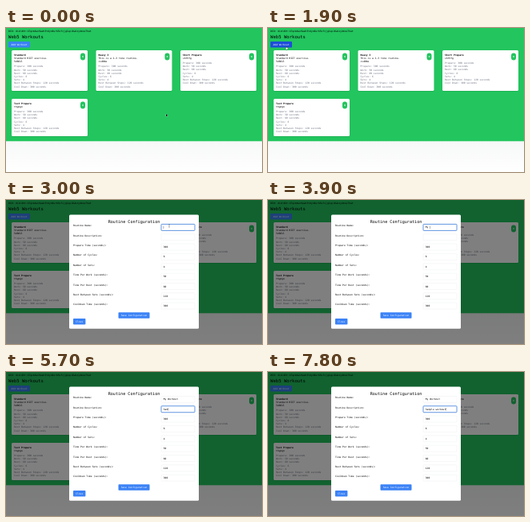
These frames come from a looping animation (320x181 px, 8000 ms). An HTML page with a canvas:

```html
<!DOCTYPE html>
<html lang="en">
<head>
<meta charset="utf-8">
<title>Workouts</title>
<style>
  html, body { margin: 0; width: 100%; height: 100%; overflow: hidden; background: #fff; }
  canvas { display: block; width: 100vw; height: 100vh; }
</style>
</head>
<body>
<canvas id="stage"></canvas>
<script>
const W = 320, H = 181, LOOP = 8000;
const GREEN = '#22c55e', BLUE = '#3b82f6', DARK_BLUE = '#1d4ed8';
const SIZE = 3.02;
const MONO = '"DejaVu Sans Mono", "Liberation Mono", monospace';
const CHAR = SIZE * 0.602;
const OPEN_AT = 2000, FOCUS_1 = 2900, FOCUS_2 = 4800;

const canvas = document.getElementById('stage');
const ctx = canvas.getContext('2d');

const cards = [
  { x: 7, y: 28, h: 51, head: ['Standard', 'Standard HIIT exercise.', '5d861l'] },
  { x: 112.5, y: 28, h: 51, head: ['Heavy 3', 'This is a 1-3 time routine.', 'cvd0be'] },
  { x: 218, y: 28, h: 51, head: ['Short Prepare', 'shfhfg'] },
  { x: 7, y: 89, h: 47, head: ['Test Prepare', 'thgngn'] }
];
const details = [
  'Prepare: 300 seconds', 'Work: 50 seconds', 'Rest: 60 seconds', 'Cycles: 6',
  'Sets: 4', 'Rest Between Steps: 120 seconds', 'Cool Down: 300 seconds'
];
const fields = [
  ['Routine Name:', ''], ['Routine Description:', ''],
  ['Prepare Time (seconds):', '300'], ['Number of Cycles:', '6'],
  ['Number of Sets:', '4'], ['Time Per Work (seconds):', '50'],
  ['Time Per Rest (seconds):', '60'], ['Rest Between Sets (seconds):', '120'],
  ['Cooldown Time (seconds):', '300']
];

// Pointer path: time, x, y
const path = [
  [0, 200, 108], [100, 200, 108], [600, 152, 84], [900, 152, 84],
  [1600, 23, 23.5], [2400, 23, 23.5], [2600, 58, 27], [2750, 90, 30],
  [2900, 204, 32.5], [4400, 204, 32.5], [4700, 199.5, 47.5], [8000, 199.5, 47.5]
];

// Typing bursts: start, end, characters before, characters after
const nameKeys = [[3700, 4300, 0, 10]];
const noteKeys = [[5500, 5700, 1, 3], [6700, 7000, 3, 7], [7300, 7800, 7, 14]];

function typed(word, bursts, t) {
  let n = 0;
  for (const [from, to, a, b] of bursts) {
    if (t >= from) n = Math.floor(a + (b - a) * Math.min(1, (t - from) / (to - from)));
  }
  return word.slice(0, n);
}

function pointer(t) {
  const i = path.findIndex(p => p[0] > t);
  const [t0, x0, y0] = path[i - 1], [t1, x1, y1] = path[i];
  const u = (t - t0) / (t1 - t0), e = u * u * (3 - 2 * u);
  return [x0 + (x1 - x0) * e, y0 + (y1 - y0) * e];
}

// Drawn large and scaled down so tiny glyphs keep exact advances
function text(str, x, y, { size = SIZE, color = '#000', weight = 400, align = 'left' } = {}) {
  ctx.save();
  ctx.translate(x, y);
  ctx.scale(0.1, 0.1);
  ctx.font = `${weight} ${size * 10}px ${MONO}`;
  ctx.textRendering = 'geometricPrecision';
  ctx.textAlign = align;
  ctx.fillStyle = color;
  ctx.fillText(str, 0, size * 3.4);
  ctx.restore();
}

function box(x, y, w, h, r, fill, stroke, line) {
  ctx.beginPath();
  ctx.roundRect(x, y, w, h, r);
  if (fill) { ctx.fillStyle = fill; ctx.fill(); }
  if (stroke) { ctx.strokeStyle = stroke; ctx.lineWidth = line; ctx.stroke(); }
}

function button(label, x, y, w, h, color = BLUE) {
  box(x, y, w, h, 0.8, color);
  text(label, x + w / 2, y + h / 2, { color: '#fff', align: 'center' });
}

function card({ x, y, h, head }) {
  box(x - 0.2, y + 0.3, 95.4, h + 0.4, 1.6, 'rgba(0,0,0,.12)');
  box(x, y, 95, h, 1.5, '#fff');
  head.forEach((line, i) => text(line, x + 3, y + 5.6 + i * 4.4, { weight: i ? 400 : 700 }));
  const top = y + 7.2 + head.length * 4.4;
  details.forEach((line, i) => text(line, x + 3, top + i * 4.2, { color: '#6b7280' }));
  const px = x + 89, py = y + 8;
  box(px - 3, py - 4.6, 6, 9.2, 3, GREEN);
  ctx.fillStyle = '#fff';
  ctx.fillRect(px - 1, py - 0.25, 2, 0.5);
  ctx.fillRect(px - 0.25, py - 1, 0.5, 2);
}

function page(hover) {
  const fade = ctx.createLinearGradient(0, 0, 0, H);
  fade.addColorStop(0, '#d6dbdc');
  fade.addColorStop(1, '#fff');
  ctx.fillStyle = fade;
  ctx.fillRect(0, 0, W, H);
  ctx.fillStyle = GREEN;
  ctx.fillRect(0, 0, W, 142.3);
  text('DID: did:dht:k7qzm4wx9aeh3tdyn8urb5ofcjg1spi6wkzy4mxe7hat', 3, 4.4);
  text('Web5 Workouts', 3, 10.6, { size: 5.62 });
  button('Add Workout', 3, 17, 27, 7.6, hover ? DARK_BLUE : BLUE);
  cards.forEach(card);
}

function caretOn(t, since, lastKey) {
  return t < lastKey + 200 || Math.floor((t - since) / 500) % 2 === 0;
}

function modal(t) {
  ctx.fillStyle = 'rgba(0,0,0,.5)';
  ctx.fillRect(0, 0, W, H);
  box(79, 18.5, 162, 143.3, 1.5, '#fff');
  text('Routine Configuration', 160, 27, { size: 5.12, align: 'center' });

  const focus = t < FOCUS_1 ? -1 : t < FOCUS_2 ? 0 : 1;
  const entries = [typed('My Workout', nameKeys, t), typed('Sample workout', noteKeys, t)];
  fields.forEach(([label, value], i) => {
    const y = 34.4 + i * 12.35;
    const entry = i < 2 ? entries[i] : value;
    text(label, 84, y - 2);
    box(194, y - 4, 42, 8, 0.8, '#fff', '#dfe2e7', 0.3);
    if (i === focus) box(194, y - 4, 42, 8, 0.8, null, '#3f80dc', 0.8);
    text(entry, 196.8, y);
  });

  if (focus >= 0) {
    const since = focus ? FOCUS_2 : FOCUS_1;
    const typing = focus ? t >= 5500 && t < 5900 || t >= 6700 : t >= 3700 && t < 4400;
    if (typing || caretOn(t, since, since)) {
      ctx.fillStyle = '#000';
      ctx.fillRect(196.8 + entries[focus].length * CHAR, 32.6 + focus * 12.35, 0.3, 3.6);
    }
  }
  button('Save Configuration', 140.5, 141.2, 39, 7.6);
  button('Close', 84, 149, 15.4, 7.6);
}

function shape(points, x, y, fill, stroke) {
  ctx.beginPath();
  points.forEach(([dx, dy]) => ctx.lineTo(x + dx, y + dy));
  ctx.closePath();
  ctx.lineJoin = 'round';
  ctx.strokeStyle = stroke;
  ctx.lineWidth = 0.5;
  ctx.stroke();
  ctx.fillStyle = fill;
  ctx.fill();
}

const arrow = [[0, 0], [0, 3], [0.7, 2.4], [1.2, 3.5], [1.7, 3.3], [1.2, 2.2], [2.1, 2.1]];
const hand = [[-0.3, 0], [0.3, 0], [0.3, 1.2], [1.7, 1.5], [1.6, 2.8], [1.1, 3.4],
  [-0.4, 3.4], [-1.3, 2.1], [-1, 1.7], [-0.3, 2.2]];

function drawPointer(t, x, y, hover) {
  if (t >= 3700 && t < 4400 || t >= 5500) return;
  const overInput = t >= OPEN_AT && x > 194;
  if (overInput) {
    ctx.strokeStyle = '#222';
    ctx.lineWidth = 0.35;
    ctx.beginPath();
    ctx.moveTo(x, y - 1.6);
    ctx.lineTo(x, y + 1.6);
    for (const s of [-1, 1]) {
      ctx.moveTo(x - 0.7, y + s * 1.7);
      ctx.lineTo(x + 0.7, y + s * 1.7);
    }
    ctx.stroke();
  } else if (hover) {
    shape(hand, x, y, '#fff', '#000');
  } else {
    shape(arrow, x, y, '#000', '#fff');
  }
}

function draw(now) {
  const t = now % LOOP;
  const ratio = window.devicePixelRatio || 1;
  const w = Math.round(innerWidth * ratio), h = Math.round(innerHeight * ratio);
  if (canvas.width !== w || canvas.height !== h) {
    canvas.width = w;
    canvas.height = h;
  }
  ctx.setTransform(w / W, 0, 0, h / H, 0, 0);

  const [x, y] = pointer(t);
  const hover = x > 3 && x < 30 && y > 17 && y < 24.6;
  page(hover && t < 2300);
  if (t >= OPEN_AT) modal(t);
  drawPointer(t, x, y, hover);
}

const start = performance.now();
function tick() {
  draw(performance.now() - start);
  requestAnimationFrame(tick);
}
tick();
</script>
</body>
</html>
```
